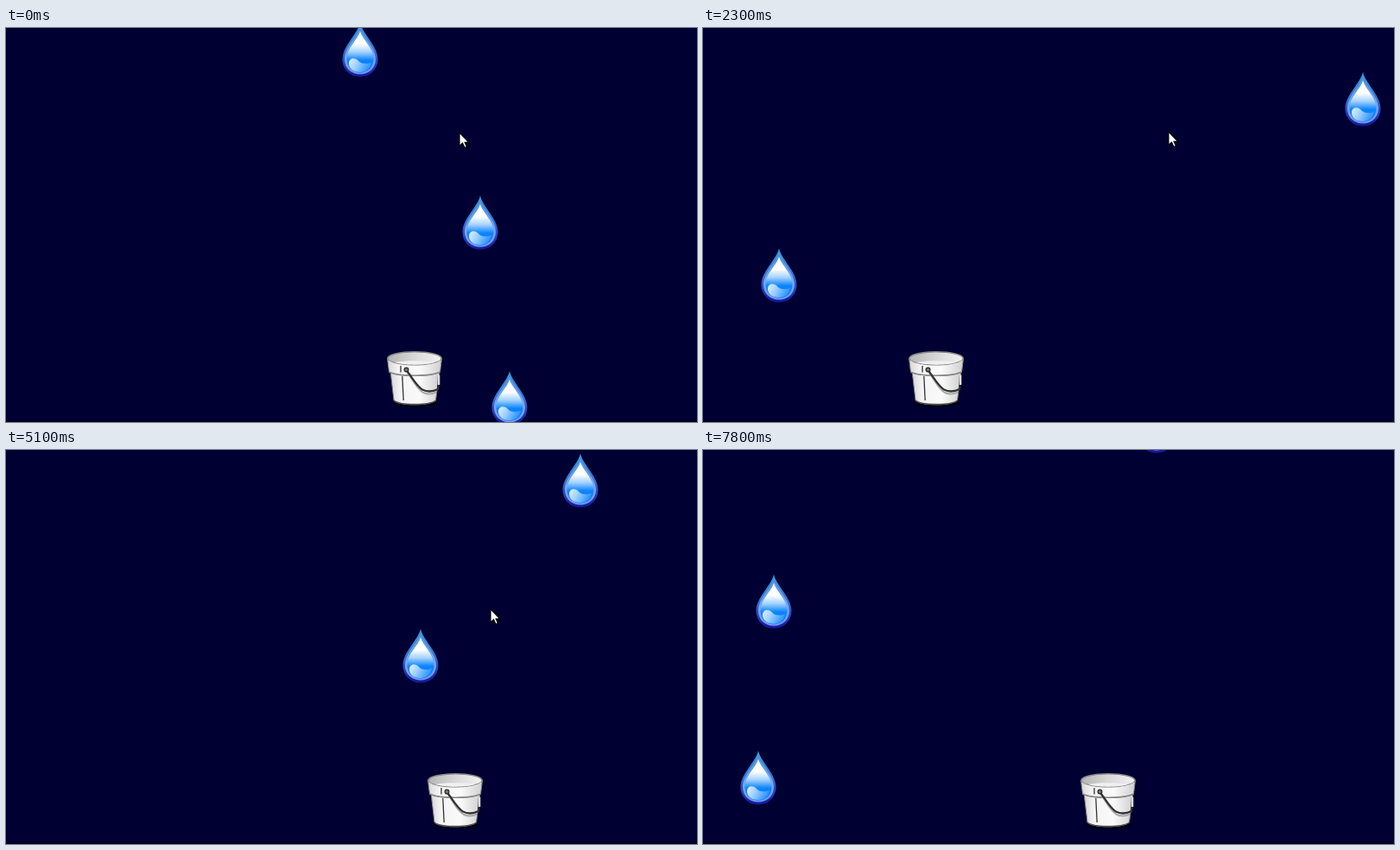
Recreate the animation shown at these times as an HTML page. Size 800 px wide and 456 px high, loop 7900 ms.

```html
<!DOCTYPE html>
<html lang="en">
<head>
<meta charset="utf-8">
<title>Catch the drops</title>
<style>
html, body { margin: 0; width: 100%; height: 100%; overflow: hidden; background: #000033; }
svg { display: block; width: 800px; height: 456px; }
</style>
</head>
<body>
<svg id="stage" viewBox="0 0 800 456">
  <defs>
    <linearGradient id="rim" x1="0" y1="0" x2="0" y2="1">
      <stop offset="0" stop-color="#3f97dc"/>
      <stop offset=".5" stop-color="#3474d4"/>
      <stop offset=".8" stop-color="#2638b8"/>
      <stop offset="1" stop-color="#14149a"/>
    </linearGradient>
    <linearGradient id="edge" x1="0" y1="0" x2="0" y2="1">
      <stop offset="0" stop-color="#4a96e0"/>
      <stop offset=".6" stop-color="#76a6ee"/>
      <stop offset="1" stop-color="#6f96ee"/>
    </linearGradient>
    <linearGradient id="water" x1="0" y1="0" x2="0" y2="1">
      <stop offset=".3" stop-color="#fff"/>
      <stop offset=".5" stop-color="#a4d2ff"/>
      <stop offset=".7" stop-color="#0c84ff"/>
      <stop offset="1" stop-color="#0a7cfa"/>
    </linearGradient>
    <linearGradient id="wave" x1="0" y1="0" x2="1" y2=".35">
      <stop offset="0" stop-color="#e4f2ff"/>
      <stop offset=".45" stop-color="#a0d0ff"/>
      <stop offset="1" stop-color="#2e96ff"/>
    </linearGradient>
    <linearGradient id="body">
      <stop offset="0" stop-color="#d6d6d6"/>
      <stop offset=".2" stop-color="#f4f4f4"/>
      <stop offset=".6" stop-color="#fafafa"/>
      <stop offset="1" stop-color="#cfcfcf"/>
    </linearGradient>
    <linearGradient id="inside">
      <stop offset="0" stop-color="#b4b4b4"/>
      <stop offset=".5" stop-color="#d8d8d8"/>
      <stop offset="1" stop-color="#f2f2f2"/>
    </linearGradient>
    <filter id="blur" x="-20%" y="-60%" width="140%" height="220%"><feGaussianBlur stdDeviation="1.5"/></filter>

    <g id="drop">
      <path fill="url(#rim)" d="M0 0C3 13 20.5 27 20.5 42C20.5 54 11.5 62.5 0 62.5S-20.5 54 -20.5 42C-20.5 27 -3 13 0 0Z"/>
      <path fill="url(#edge)" d="M0 5C3 16 18 28 18 42C18 52.500 10 59.500 0 59.500S-18 52.500 -18 42C-18 28 -3 16 0 5Z"/>
      <path fill="url(#water)" d="M0 10C3 20 15.500 29 15.500 42C15.500 51 9 57.500 0 57.500S-15.500 51 -15.500 42C-15.500 29 -3 20 0 10Z"/>
      <path fill="url(#wave)" d="M-13 47C-13 40.500 -6 39.500 -2.500 43.500C1 47.500 6 48.500 13 46C12 53 6.500 57 0 57C-7.500 57 -13 53 -13 47Z"/>
    </g>

    <g id="pail">
      <ellipse cx="33" cy="59.500" rx="26" ry="4" fill="#000" filter="url(#blur)"/>
      <path fill="url(#body)" stroke="#777" d="M4 23L8 57C14 63.500 50 63.500 56.500 57L61 23Z"/>
      <path fill="none" stroke="#555" stroke-width="1.500" d="M8 57C14 63 50 63 56.500 57"/>
      <path fill="url(#body)" stroke="#8a8a8a" d="M.6 9L2.500 24C12 30 52 30 61.500 24L63.400 9Z"/>
      <path fill="none" stroke="#888" stroke-width="1.500" d="M2.500 24C12 29.500 52 29.500 61.500 24"/>
      <ellipse cx="32" cy="8.500" rx="31.200" ry="7.700" fill="url(#inside)" stroke="#858585" stroke-width="1.600"/>
      <path fill="#f0f0f0" d="M9 13C20 10.500 44 10.500 55 13C44 16.500 20 16.500 9 13Z"/>
      <path fill="none" stroke="#fff" stroke-width=".8" d="M2 11C10 19 54 19 62 11"/>
      <path fill="none" stroke="#333" stroke-width="1.300" d="M16 17V24.500M17.800 29L19.200 57"/>
      <path fill="none" stroke="#aaa" stroke-width="2" d="M24 25C31 35 35 44 42 48C48 50.500 53 49.500 57 47.500"/>
      <path fill="none" stroke="#333" stroke-width="2.300" d="M22.500 22C29 30 34 40 41 44.500C47 47.500 54 46.500 59 44L60 28"/>
      <path stroke="#ddd" stroke-width="2.600" d="M60 27.500V39"/>
      <circle cx="22.500" cy="21.500" r="2.400" fill="#777" stroke="#2a2a2a" stroke-width="1.200"/>
    </g>
  </defs>

  <rect width="800" height="456" fill="#000033"/>
  <rect y="454" width="800" height="2" fill="#000020"/>
  <use id="bucket" href="#pail"/>
  <g id="rain"></g>
  <path id="cursor" fill="#fff" stroke="#000" stroke-width="1.200" d="M0 0V15.500L3.600 12.200L6 17.500L8.500 16.500L6.200 11.300H10.800Z"/>
</svg>
<script>
const LOOP = 7900, STEP = 100, SPEED = 0.2, START_Y = -85;

// x, time of birth, time caught (if ever)
const drops = [
  [583, -2410], [549, -1395, 600], [410, -395, 1600], [88, 600, 2900],
  [764, 1620], [549, 2620, 4900], [480, 3638, 5700], [665, 4655, 6700],
  [64, 5637], [82, 6655], [525, 7670]
];

// time, x
const bucketKeys = [
  [0, 441], [250, 491], [1030, 491], [2900, 118], [3200, 118],
  [5050, 488], [5800, 488], [6500, 628], [6545, 628], [7500, 437]
];

// time, x, y
const cursorKeys = [
  [0, 525, 121], [1600, 526, 122], [2900, 550, 118], [4100, 446, 58],
  [5100, 561, 184], [6900, 385, 181], [7200, 385, 181], [7600, 19, 186]
];

const byId = id => document.getElementById(id);
const place = (el, x, y) => el.setAttribute('transform', `translate(${Math.round(x)} ${Math.round(y)})`);
const show = (el, on) => el.setAttribute('visibility', on ? 'visible' : 'hidden');

function along(keys, t, col) {
  const i = keys.findIndex(k => k[0] > t);
  if (i < 0) return keys[keys.length - 1][col];
  const a = keys[i - 1], b = keys[i];
  return a[col] + (b[col] - a[col]) * (t - a[0]) / (b[0] - a[0]);
}

const dropEls = drops.map(() => {
  const el = document.createElementNS('http://www.w3.org/2000/svg', 'use');
  el.setAttribute('href', '#drop');
  return byId('rain').appendChild(el);
});

function draw(t) {
  drops.forEach(([x, born, caught = Infinity], i) => {
    place(dropEls[i], x, START_Y + (t - born) * SPEED);
    show(dropEls[i], t >= born && t < caught);
  });
  place(byId('bucket'), along(bucketKeys, t, 1), 374);
  place(byId('cursor'), along(cursorKeys, t, 1), along(cursorKeys, t, 2));
  show(byId('cursor'), t < 7700);
}

const began = performance.now();
function tick() {
  const t = (performance.now() - began) % LOOP;
  draw(Math.floor(t / STEP) * STEP);
  requestAnimationFrame(tick);
}
tick();
</script>
</body>
</html>
```
